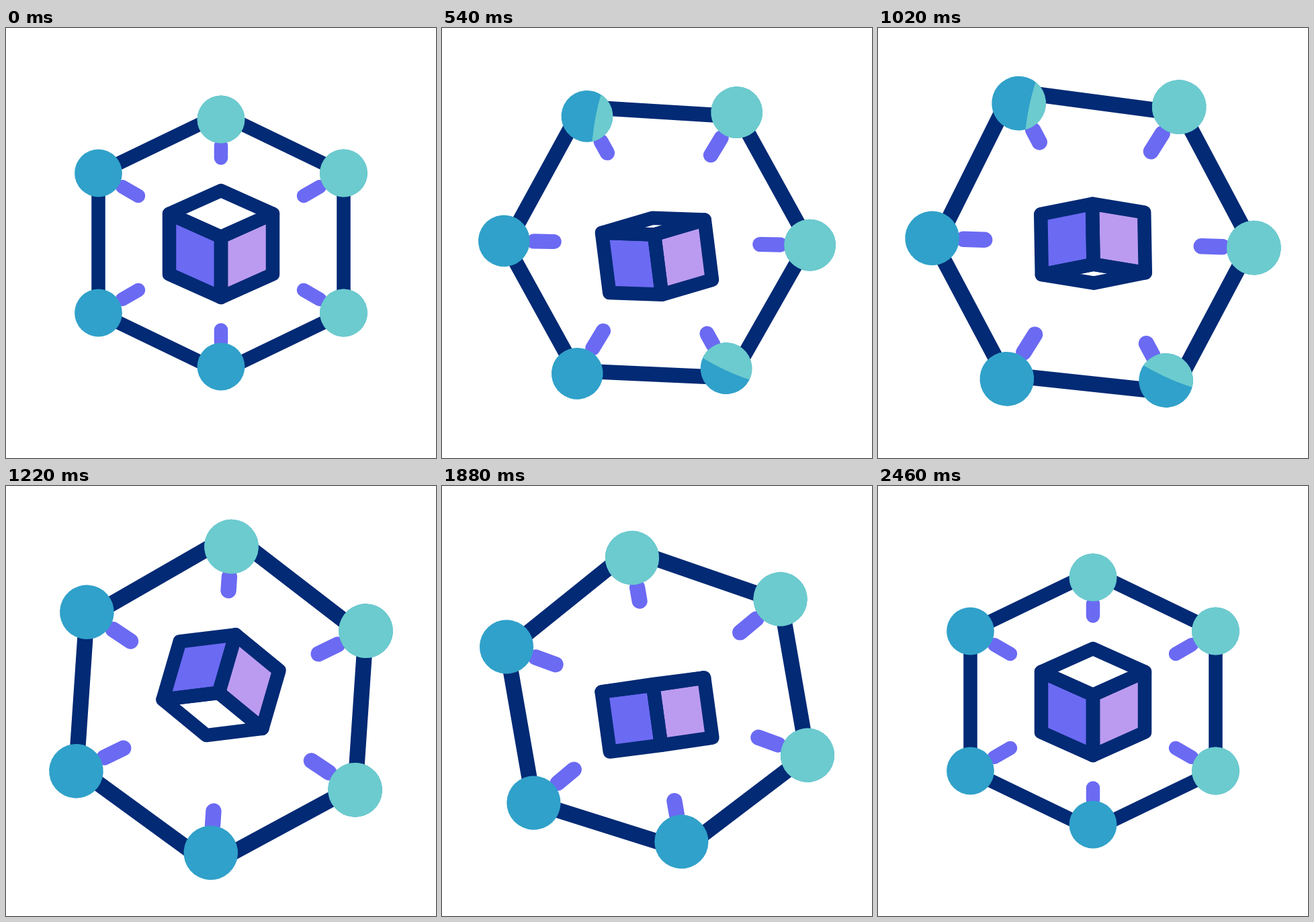
Animation, 640 px wide and 640 px high, one loop 3 s. Source, as an HTML page with a canvas:

```html
<!DOCTYPE html>
<html lang="en">
<head>
<meta charset="utf-8">
<title>Block network</title>
<style>
  html, body { margin: 0; width: 100%; height: 100%; overflow: hidden; background: #fff; }
  canvas { display: block; width: 640px; height: 640px; }
</style>
</head>
<body>
<canvas id="stage" width="640" height="640"></canvas>
<script>
const ctx = document.getElementById('stage').getContext('2d');
const NAVY = '#022a75', TEAL = '#6ccbce', BLUE = '#30a1ca', VIOLET = '#6b6af3', LILAC = '#bb9bf0';
const LOOP = 3000, STEP = 20, TAU = Math.PI * 2;

// Each track is a list of [time, value] keys, eased in and out between them.
const tracks = {
  spin: [[200, 0], [800, -48.2], [1400, 18.2], [1900, -10], [2430, 0]],
  zoom: [[200, 0], [800, 1], [1800, 1], [2400, 0]],
  push: [[200, 0], [800, 23], [1800, 5.5], [2400, 0]],
  tilt: [[200, 0], [800, -12], [1400, 24], [1900, -8], [2430, 0]],
  pitch: [[200, 34.5], [760, 1], [800, 1], [1300, -35.5], [1900, 0.8], [2430, 34.5]],
  lift: [[200, 0], [600, 19.5], [800, 18.5], [1300, -28.5], [1600, 18.5], [1900, 19], [2430, 0]]
};

function valueAt(keys, t) {
  if (t <= keys[0][0]) return keys[0][1];
  for (let i = 1; i < keys.length; i++) {
    const [t0, a] = keys[i - 1], [t1, b] = keys[i];
    if (t < t1) {
      const u = (t - t0) / (t1 - t0);
      return a + (b - a) * u * u * (3 - 2 * u);
    }
  }
  return keys[keys.length - 1][1];
}

const radians = deg => deg * Math.PI / 180;

function trace(points, closed = true) {
  ctx.beginPath();
  points.forEach(([x, y]) => ctx.lineTo(x, y));
  if (closed) ctx.closePath();
}

function strokePath(points, color, width, closed) {
  trace(points, closed);
  ctx.strokeStyle = color;
  ctx.lineWidth = width;
  ctx.stroke();
}

function fillPath(points, color) {
  trace(points);
  ctx.fillStyle = color;
  ctx.fill();
}

function drawNodes(nodes, color) {
  ctx.fillStyle = color;
  for (const [x, y] of nodes) {
    ctx.beginPath();
    ctx.arc(x, y, 35.4, 0, TAU);
    ctx.fill();
  }
}

function drawNetwork(p) {
  const k = p.push / 23, skew = 1.7 * p.zoom;
  const up = p.push + skew, down = p.push - skew;
  const sideX = 182.5, sideY = 104;
  const nodes = [
    [0, -184 - up], [sideX, -sideY], [sideX, sideY],
    [0, 184 + down], [-sideX, sideY], [-sideX, -sideY]
  ];
  const jointY = sideY - 9 * k;
  const frame = [
    [0, -192 - 34 * k - skew], [sideX, -jointY + skew], [sideX, jointY + skew],
    [0, 192 + 34 * k - skew], [-sideX, jointY + skew], [-sideX, -jointY + skew]
  ];

  ctx.save();
  ctx.translate(320, 320);
  ctx.scale(1 + 0.14 * p.zoom, 1 + 0.14 * p.zoom);

  ctx.save();
  ctx.rotate(radians(p.spin));
  strokePath(frame, NAVY, 20.5);
  strokePath([[0, -126.5 - up], [0, -144.5 - up]], VIOLET, 20.5, false);
  strokePath([[0, 129.5 + down], [0, 147.5 + down]], VIOLET, 20.5, false);
  for (const sx of [-1, 1]) for (const sy of [-1, 1]) {
    strokePath([[123 * sx, 70 * sy], [147 * sx, 83.8 * sy]], VIOLET, 20.5, false);
  }
  drawNodes(nodes, BLUE);
  ctx.restore();

  // Nodes turn teal inside a large circle that does not spin with them.
  ctx.beginPath();
  ctx.arc(227.5, -113.5, 317.5, 0, TAU);
  ctx.clip();
  ctx.rotate(radians(p.spin));
  drawNodes(nodes, TEAL);
  ctx.restore();
}

function drawCube(p) {
  const w = 77, h = 45, d = p.pitch;
  const topLeft = [-w, -h], topMid = [0, d - h], topRight = [w, -h];
  const lowLeft = [-w, h], lowMid = [0, d + h], lowRight = [w, h];
  const left = [topLeft, topMid, lowMid, lowLeft];
  const right = [topMid, topRight, lowRight, lowMid];
  const cap = d > 0
    ? [topLeft, [0, -h - d], topRight, topMid]
    : [lowLeft, [0, h - d], lowRight, lowMid];

  ctx.save();
  ctx.translate(320, 321.5 + p.lift);
  ctx.rotate(radians(p.tilt));
  fillPath(cap, '#fff');
  fillPath(left, VIOLET);
  fillPath(right, LILAC);
  [cap, left, right].forEach(face => strokePath(face, NAVY, 20.5));
  ctx.restore();
}

function draw(now) {
  const t = Math.floor((now % LOOP) / STEP) * STEP;
  const pose = {};
  for (const name in tracks) pose[name] = valueAt(tracks[name], t);
  ctx.fillStyle = '#fff';
  ctx.fillRect(0, 0, 640, 640);
  ctx.lineJoin = ctx.lineCap = 'round';
  drawNetwork(pose);
  drawCube(pose);
}

const start = performance.now();
function tick() {
  draw(performance.now() - start);
  requestAnimationFrame(tick);
}
tick();
</script>
</body>
</html>
```
